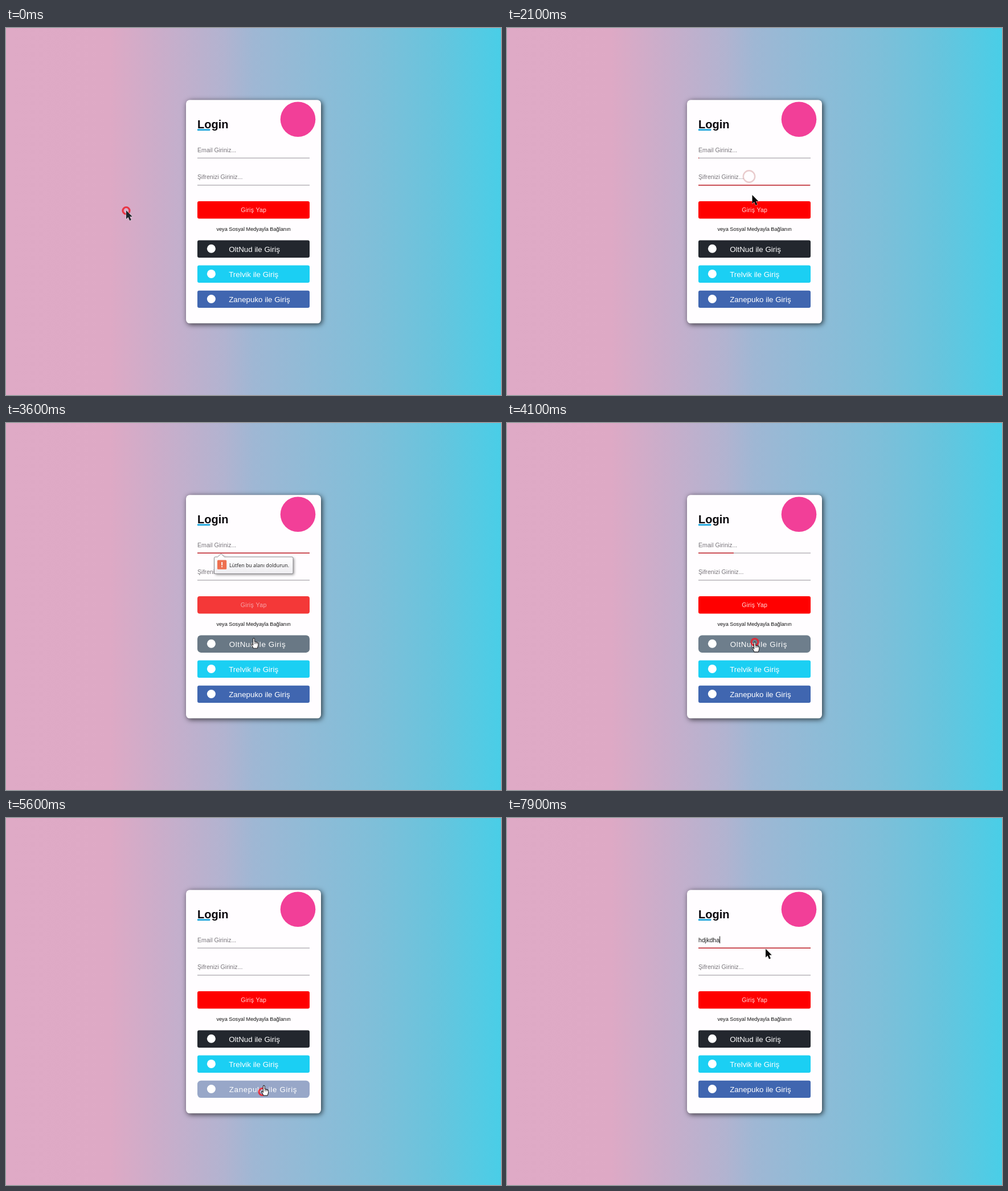
These frames come from a looping animation (869x644 px, 8000 ms). An HTML page with a canvas:

```html
<!DOCTYPE html>
<html lang="tr">
<head>
<meta charset="utf-8">
<title>Login</title>
<style>
  html, body { margin: 0; width: 100%; height: 100%; overflow: hidden; background: #dea9c5; }
  canvas { display: block; }
</style>
</head>
<body>
<canvas id="stage" width="869" height="644"></canvas>
<script>
const ctx = document.getElementById('stage').getContext('2d');
const LOOP = 8000;
const SANS = '"Liberation Sans", Arial, sans-serif';

// Pointer stops: time, x, y
const path = [
  [100, 211, 320], [720, 383, 217], [1080, 383, 217], [1240, 393, 222],
  [1580, 425, 260], [1850, 425, 260], [2320, 435, 320], [3300, 435, 321],
  [3550, 435, 379], [3750, 435, 384], [4050, 435, 384], [4400, 435, 425],
  [4870, 435, 425], [5200, 450, 480], [5500, 450, 480], [5620, 453, 471],
  [6250, 440, 217], [6650, 440, 217], [7050, 454, 229.5]
];
const clicks = [[-40, 211, 320], [790, 383, 217], [1650, 425, 260], [2490, 435, 320],
  [3900, 435, 384], [4720, 435, 425], [5450, 450, 480], [6500, 440, 217]];

const emailFocus = [[790, 1650], [2650, 3900], [6500, Infinity]];
const passFocus = [[1650, 2490]];
const tipTime = [2700, 3900];
const typed = 'hdjkdha', typeStart = 7200, typeStep = 100;

const buttons = [
  { y: 304, base: [255, 0, 0], over: [214, 212, 214] },
  { y: 372.5, base: [35, 39, 46], over: [110, 126, 140], label: 'OltNud ile Giriş' },
  { y: 416.6, base: [27, 207, 243], over: [165, 180, 188], label: 'Trelvik ile Giriş' },
  { y: 460.7, base: [64, 102, 176], over: [152, 167, 200], label: 'Zanepuko ile Giriş' }
];
const BX = 336, BW = 197, BH = 30.4;

const clamp = v => Math.max(0, Math.min(1, v));
const mix = (a, b, k) => a + (b - a) * k;
const mixRgb = (a, b, k) => `rgb(${a.map((v, i) => Math.round(mix(v, b[i], k)))})`;
const smooth = k => k * k * (3 - 2 * k);

// CSS "ease": cubic-bezier(.25, .1, .25, 1)
function ease(x) {
  x = clamp(x);
  if (x === 0 || x === 1) return x;
  let lo = 0, hi = 1, u;
  for (let i = 0; i < 20; i++) {
    u = (lo + hi) / 2;
    const bx = .75 * u * (1 - u) + u * u * u;
    if (bx < x) lo = u; else hi = u;
  }
  return .3 * u * (1 - u) * (1 - u) + 3 * u * u * (1 - u) + u * u * u;
}

// Transition amount for a set of on/off spans
function level(spans, t, inMs, outMs) {
  return spans.reduce((m, [on, off]) =>
    Math.max(m, ease((t - on) / inMs) * (1 - ease((t - off) / outMs))), 0);
}

function pointer(t) {
  if (t <= path[0][0]) return path[0].slice(1);
  for (let i = 1; i < path.length; i++) {
    const [t0, x0, y0] = path[i - 1], [t1, x1, y1] = path[i];
    if (t < t1) {
      const k = smooth((t - t0) / (t1 - t0));
      return [mix(x0, x1, k), mix(y0, y1, k)];
    }
  }
  return path[path.length - 1].slice(1);
}

const inside = ([x, y], top, h) => x >= BX && x <= BX + BW && y >= top && y <= top + h;

for (const b of buttons) {
  b.spans = [];
  let on = null;
  for (let t = 0; t <= LOOP; t += 10) {
    const hit = inside(pointer(t), b.y, BH);
    if (hit && on === null) on = t;
    if (!hit && on !== null) { b.spans.push([on, t]); on = null; }
  }
}

function text(str, x, y, font, color, align = 'left', spacing = 0) {
  ctx.font = font;
  ctx.fillStyle = color;
  ctx.textAlign = align;
  ctx.letterSpacing = spacing + 'px';
  ctx.fillText(str, x, y);
  ctx.letterSpacing = '0px';
}

function box(x, y, w, h, r, color) {
  ctx.fillStyle = color;
  ctx.beginPath();
  ctx.roundRect(x, y, w, h, r);
  ctx.fill();
}

function disc(x, y, r, color) {
  ctx.fillStyle = color;
  ctx.beginPath();
  ctx.arc(x, y, r, 0, Math.PI * 2);
  ctx.fill();
}

function shadow(color, blur, dx, dy) {
  ctx.shadowColor = color;
  ctx.shadowBlur = blur;
  ctx.shadowOffsetX = dx;
  ctx.shadowOffsetY = dy;
}
const noShadow = () => shadow('transparent', 0, 0, 0);

const sky = ctx.createLinearGradient(0, 0, 869, 0);
[[0, '#dfaac6'], [.21, '#dea9c5'], [.33, '#c7aecb'], [.44, '#b2b3d0'], [.5, '#9fb7d4'],
  [.58, '#94bad6'], [.75, '#7ebfd9'], [.87, '#68c4dd'], [1, '#49cee7']]
  .forEach(([p, c]) => sky.addColorStop(p, c));

function drawCard() {
  ctx.fillStyle = sky;
  ctx.fillRect(0, 0, 869, 644);
  shadow('rgba(0,0,0,.72)', 10, 2, 2);
  box(316, 126.3, 237, 392, 6.5, '#fffdff');
  noShadow();
  disc(512.5, 160.2, 30.8, '#f23f98');
  box(336, 177.3, 22.3, 2.8, 0, '#1ba5dc');
  text('Login', 336, 176, `bold 20px ${SANS}`, '#08060a');
  text('veya Sosyal Medyayla Bağlanın', 434.5, 356.3, `9.2px ${SANS}`, '#111', 'center');
}

function drawField(y, hint, value, fill) {
  const font = `10.6px ${SANS}`;
  text(value || hint, 336, y - 10.6, font, value ? '#1a1a1a' : '#79767b');
  box(BX, y - .8, BW, 1.5, 0, '#b7b4ba');
  box(BX, y - .8, BW * fill, 1.5, 0, '#c5232b');
}

function drawCaret(t, value) {
  const span = emailFocus.find(([a, b]) => t >= a && t < b);
  if (!span) return;
  const since = value ? t - typeStart - (value.length - 1) * typeStep : t - span[0];
  if (since % 1000 >= 500) return;
  ctx.font = `10.6px ${SANS}`;
  box(336 + ctx.measureText(value).width, 207.5, 1, 12.5, 0, '#111');
}

function drawButton(b, t) {
  const k = level(b.spans, t, 150, 500);
  box(BX, b.y, BW, BH, mix(3, 6.5, k), mixRgb(b.base, b.over, k));
  if (b.label) {
    disc(360.4, b.y + 14.8, 7.5, '#fff');
    text(b.label, 391.2 + .6 * k, b.y + 20, `13.33px ${SANS}`, '#fff', 'left', .66 * k);
  } else {
    const weight = k > .5 ? 'bold ' : '';
    text('Giriş Yap', 434.7, b.y + 19, `${weight}10.6px ${SANS}`,
      mixRgb([255, 222, 222], [224, 10, 24], k), 'center', mix(.25, .72, k));
  }
}

function drawTip() {
  ctx.beginPath();
  ctx.moveTo(367.5, 235);
  ctx.lineTo(371.5, 235);
  ctx.lineTo(377.5, 229.5);
  ctx.lineTo(383.5, 235);
  ctx.lineTo(502, 235);
  ctx.quadraticCurveTo(504, 235, 504, 237);
  ctx.lineTo(504, 262.5);
  ctx.quadraticCurveTo(504, 264.5, 502, 264.5);
  ctx.lineTo(367.5, 264.5);
  ctx.quadraticCurveTo(365.5, 264.5, 365.5, 262.5);
  ctx.lineTo(365.5, 237);
  ctx.quadraticCurveTo(365.5, 235, 367.5, 235);
  ctx.closePath();
  const g = ctx.createLinearGradient(0, 235, 0, 264);
  g.addColorStop(0, '#ffffff');
  g.addColorStop(1, '#eeedf1');
  shadow('rgba(0,0,0,.4)', 4, 2, 2);
  ctx.fillStyle = g;
  ctx.fill();
  noShadow();
  ctx.strokeStyle = '#8b898d';
  ctx.lineWidth = 1;
  ctx.stroke();
  box(371, 240.5, 16.2, 16.2, 1.5, '#ee7050');
  box(378.2, 244, 1.9, 5.8, 0, '#fff');
  box(378.2, 251.2, 1.9, 1.9, 0, '#fff');
  text('Lütfen bu alanı doldurun.', 392, 252.7, '8.9px "Open Sans", "Noto Sans", sans-serif', '#1a1a1a');
}

function drawRing(t) {
  for (const [at, x, y] of clicks) {
    const age = t - at;
    if (age < 0 || age > 520) continue;
    const k = clamp((age - 200) / 240);
    ctx.globalAlpha = age < 200 ? .85 : mix(.85, .4, k) * clamp((520 - age) / 80);
    ctx.strokeStyle = mixRgb([236, 32, 44], [190, 110, 110], k);
    ctx.lineWidth = mix(3.2, 2.4, k);
    ctx.beginPath();
    ctx.arc(x, y + .5, mix(6, 10.2, k), 0, Math.PI * 2);
    ctx.stroke();
    ctx.globalAlpha = 1;
  }
}

const arrow = new Path2D('M0 0V15.2L3.5 12L6.1 18L8.9 16.8L6.3 11H10.8Z');
const hand = new Path2D('M-1.4 10V-1Q0-3.4 1.4-1V4L6 5Q8 5.6 8 8Q8 12 6.2 15.5H-.8Q-2.2 12-4.4 9.5Q-4.6 7-2.6 8Z');

function drawPointer(t) {
  const [x, y] = pointer(t);
  ctx.save();
  ctx.translate(x, y);
  ctx.lineJoin = 'round';
  if (inside([x, y], 203, 26)) {
    box(-.6, -5.5, 1.2, 11, 0, '#333');
    box(-2, -6, 4, 1, 0, '#333');
    box(-2, 5, 4, 1, 0, '#333');
  } else if (inside([x, y], 251, 25)) {
    box(-.6, -5.5, 1.2, 11, 0, '#333');
    box(-2, -6, 4, 1, 0, '#333');
    box(-2, 5, 4, 1, 0, '#333');
  } else if (buttons.some(b => inside([x, y], b.y, BH))) {
    ctx.fillStyle = '#fff';
    ctx.strokeStyle = '#26262a';
    ctx.lineWidth = 1.1;
    ctx.fill(hand);
    ctx.stroke(hand);
    ctx.lineWidth = .8;
    ctx.beginPath();
    for (const fx of [1.6, 3.8, 6]) { ctx.moveTo(fx, 5); ctx.lineTo(fx, 8); }
    ctx.stroke();
  } else {
    ctx.strokeStyle = 'rgba(255,255,255,.6)';
    ctx.lineWidth = 1.2;
    ctx.stroke(arrow);
    ctx.fillStyle = x < 316 ? '#20262b' : '#050505';
    ctx.fill(arrow);
  }
  ctx.restore();
}

function draw(t) {
  const count = t < typeStart ? 0 : Math.floor((t - typeStart) / typeStep) + 1;
  const value = typed.slice(0, count);
  drawCard();
  drawField(228.3, 'Email Giriniz...', value, level(emailFocus, t, 500, 500));
  drawField(275.8, 'Şifrenizi Giriniz...', '', level(passFocus, t, 500, 500));
  drawCaret(t, value);
  buttons.forEach(b => drawButton(b, t));
  if (t >= tipTime[0] && t < tipTime[1]) drawTip();
  drawRing(t);
  drawPointer(t);
}

const start = performance.now();
function tick() {
  draw((performance.now() - start) % LOOP);
  requestAnimationFrame(tick);
}
draw(0);
requestAnimationFrame(tick);
</script>
</body>
</html>
```
